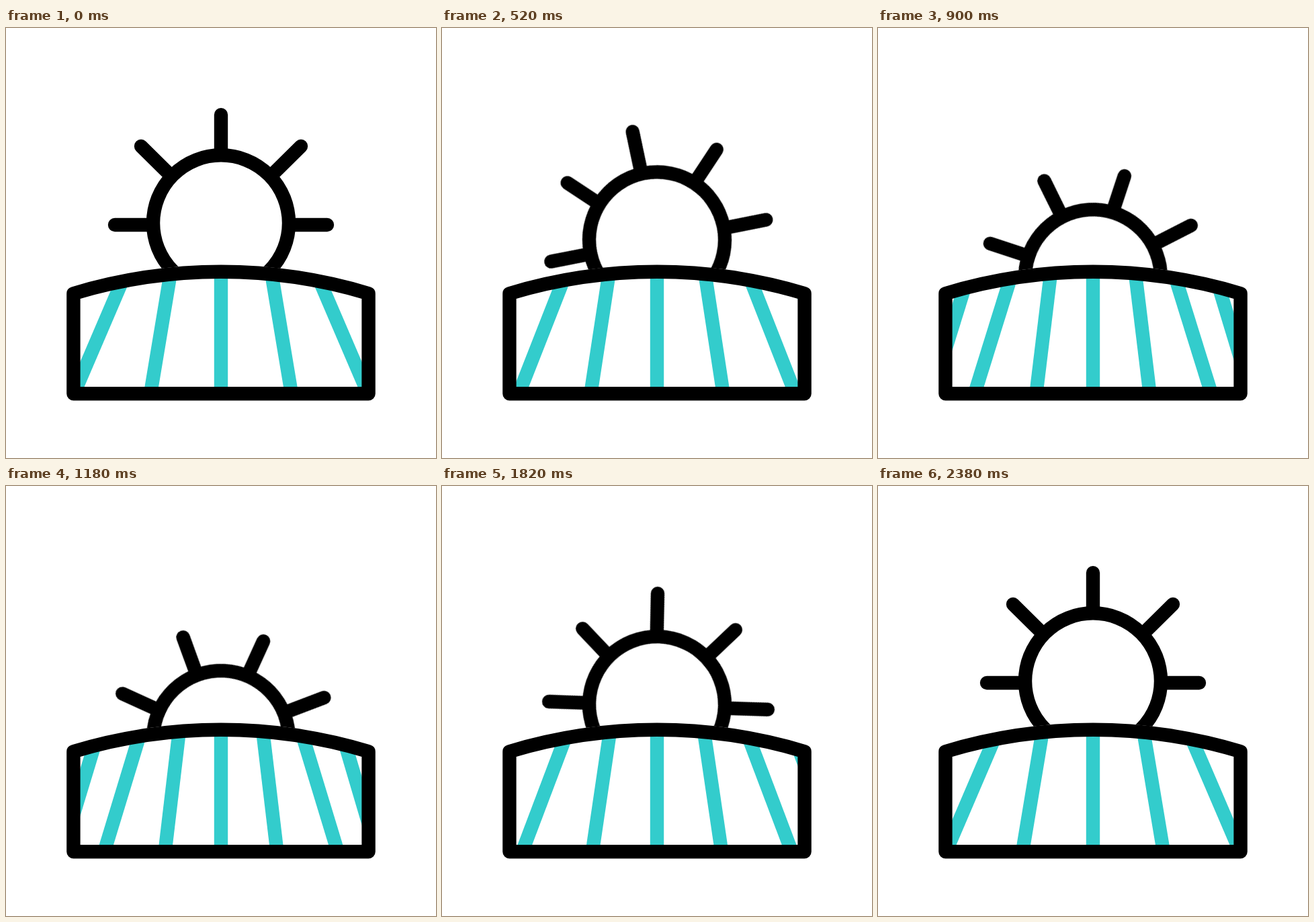
Animation, 640 px wide and 640 px high, one loop 2400 ms. Source, as an HTML page:

```html
<!DOCTYPE html>
<html lang="en">
<head>
<meta charset="utf-8">
<title>Sunrise over a field</title>
<style>
  html, body { margin: 0; width: 100%; height: 100%; overflow: hidden; background: #fff; }
  svg { display: block; width: 100%; height: 100%; }

  .ink, .rows { fill: none; stroke-width: 20.4; }
  .ink { stroke: #000; stroke-linecap: round; stroke-linejoin: round; }
  .rows { stroke: #3cc; }

  .sun, .row {
    animation: 2400ms cubic-bezier(.73, 0, .28, 1) infinite;
  }
  .sun { transform-origin: 320px 290.3px; animation-name: set; }
  .inner { animation-name: inner; }
  .outer { animation-name: outer; }
  .edge-l { animation-name: edge-l; }
  .edge-r { animation-name: edge-r; }

  @keyframes set {
    0%, 99.167%, 100% { transform: translateY(0) rotate(0deg); }
    49.583% { transform: translateY(85.6px) rotate(114.5deg); }
  }
  @keyframes inner {
    0%, 99.167%, 100% { d: path("M-75.1 365L-105.1 545"); }
    49.583% { d: path("M-62.2 365L-83.5 545"); }
  }
  @keyframes outer {
    0%, 99.167%, 100% { d: path("M-142 365L-219.2 545"); }
    49.583% { d: path("M-119.3 365L-174 545"); }
  }
  @keyframes edge-l {
    0%, 99.167%, 100% { d: path("M-229 365L-306 545"); }
    49.583% { d: path("M-182 365L-236.6 545"); }
  }
  @keyframes edge-r {
    0%, 99.167%, 100% { d: path("M216 365L293.4 545"); }
    49.583% { d: path("M179.1 365L232.2 545"); }
  }
</style>
</head>
<body>
<svg viewBox="0 0 640 640">
  <defs>
    <clipPath id="sky"><path d="M0 0H640V384.7H540A770.6 770.6 0 0 0 100 384.7H0Z"/></clipPath>
    <clipPath id="field"><path d="M100.4 395.2A760.4 760.4 0 0 1 539.6 395.2V544.3H100.4Z"/></clipPath>
  </defs>

  <g clip-path="url(#sky)">
    <g class="ink sun">
      <circle cx="320" cy="290.3" r="101"/>
      <path d="M320 129.2V185M201 176L243 217.5M439 176L397 217.5M162 293H215M478 293H425
               M206.2 404.1L246 365M433.8 404.1L394 365M320 451.5V395"/>
    </g>
  </g>

  <g clip-path="url(#field)">
    <g class="rows" transform="translate(320)">
      <path d="M0 360V545"/>
      <path class="row inner" d="M-75.1 365L-105.1 545"/>
      <path class="row outer" d="M-142 365L-219.2 545"/>
      <path class="row edge-l" d="M-229 365L-306 545"/>
      <g transform="scale(-1 1)">
        <path class="row inner" d="M-75.1 365L-105.1 545"/>
        <path class="row outer" d="M-142 365L-219.2 545"/>
      </g>
      <path class="row edge-r" d="M216 365L293.4 545"/>
    </g>
  </g>
  <path class="ink" d="M100.4 395.2A760.4 760.4 0 0 1 539.6 395.2V544.3H100.4Z"/>
</svg>
</body>
</html>
```
